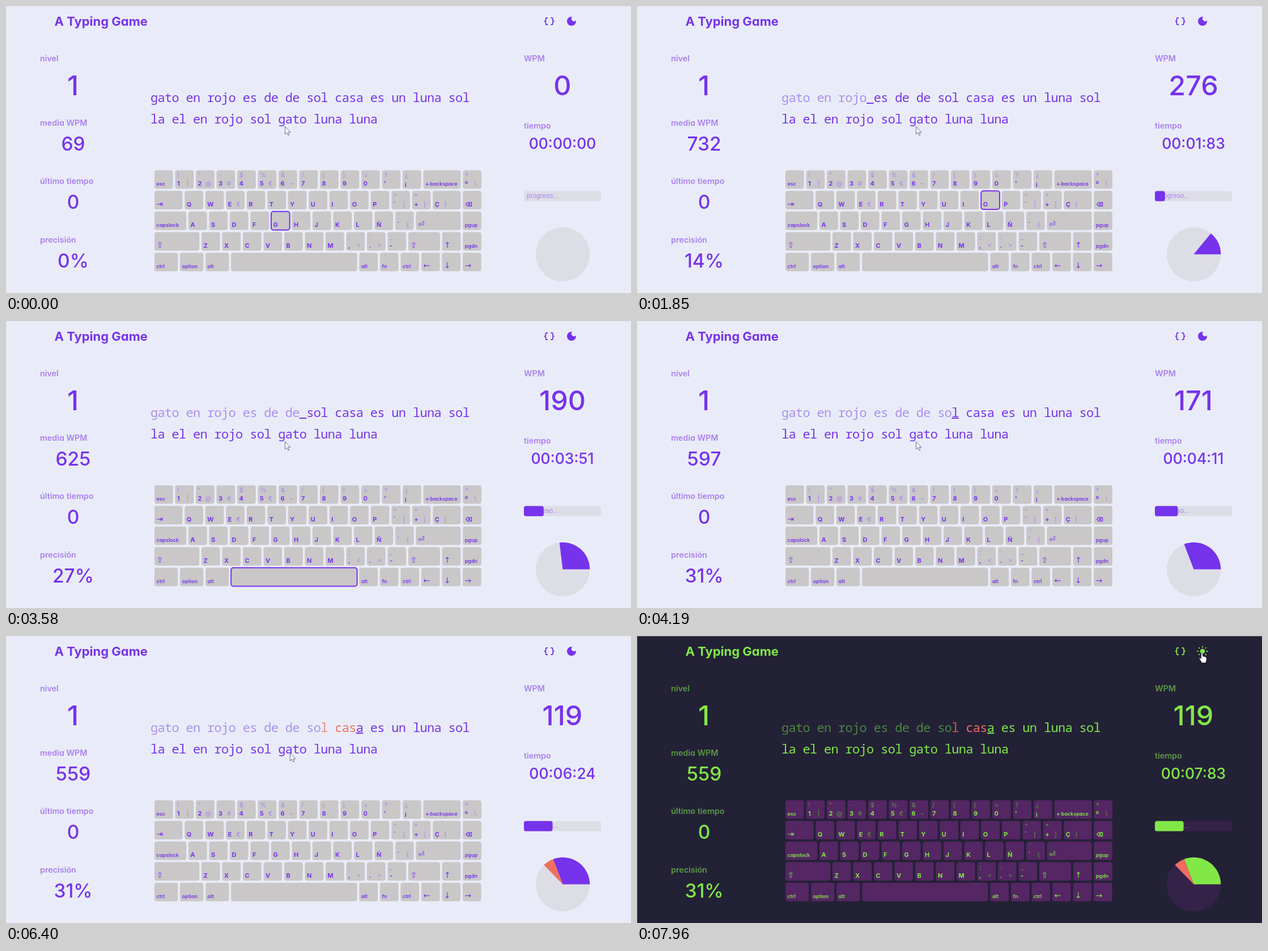
These frames come from a looping animation (1103 by 508 pixels, 8000 ms). An HTML page:

```html
<!DOCTYPE html>
<html lang="es">
<head>
<meta charset="utf-8">
<title>A Typing Game</title>
<style>
  :root {
    --bg: #e9ecf8; --edge: #e2e5f1; --main: #7633ec; --soft: #aa80f0; --done: #ac8ff0;
    --key: #c9c7c8; --track: #dddde6; --bad: #ef705f;
  }
  :root.dark {
    --bg: #232136; --edge: #5b5a69; --main: #82e847; --soft: #5c9a43; --done: #4d8540;
    --key: #542663; --track: #352249; --bad: #f06c60;
  }
  html, body { margin: 0; width: 100%; height: 100%; overflow: hidden; background: var(--bg); }
  svg { display: block; width: 100%; height: 100%; }
  text { font-family: Inter, "DejaVu Sans", sans-serif; font-weight: 500; fill: var(--main); white-space: pre; }
  .title { font-size: 22px; font-weight: 700; font-feature-settings: "cv11"; }
  .label { font-size: 14.3px; font-weight: 600; fill: var(--soft); font-feature-settings: "cv11"; }
  .big, .mid, .time { text-anchor: middle; }
  .big { font-size: 48.5px; }
  .mid { font-size: 33.5px; }
  .time { font-size: 26.5px; }
  .words { font: 400 22px "Noto Sans Mono", "DejaVu Sans Mono", monospace; letter-spacing: -0.69px; }
  .hint { font-size: 11px; font-weight: 400; fill: var(--soft); }
  .cap { font-size: 11px; font-weight: 700; }
  .name { font-size: 9px; font-weight: 600; font-feature-settings: "cv11"; }
  .icon { font: 400 14px "DejaVu Sans", sans-serif; }
  .alt { font-size: 11px; font-weight: 400; fill: var(--soft); }
  .key { fill: var(--key); }
  .key.on { stroke: var(--main); stroke-width: 2; }
  .done { fill: var(--done); }
  .bad { fill: var(--bad); }
  .main { fill: var(--main); }
  .track { fill: var(--track); }
  .line { fill: none; stroke: var(--main); stroke-width: 1.8; }
  .sun, .dark .moon, .hand { display: none; }
  .dark .sun { display: inline; }
</style>
</head>
<body>
<svg viewBox="0 0 1103 508">
  <rect width="1103" height="508" style="fill:var(--bg)"/>
  <path d="M.5 508V.5H1103" fill="none" style="stroke:var(--edge)"/>

  <text class="title" x="85.5" y="34.5">A Typing Game</text>
  <path class="line" d="M956 21h-1.5q-2 0-2 2v2q0 2-2.5 2q2.5 0 2.5 2v2q0 2 2 2h1.5M961.5 21h1.5q2 0 2 2v2q0 2 2.5 2q-2.5 0-2.5 2v2q0 2-2 2h-1.5"/>
  <path class="main moon" d="M998 19a8 8 0 1 0 8 8q0-.6-.1-1.2a4.6 4.6 0 0 1-6.7-6.7Q998.6 19 998 19z"/>
  <g class="sun">
    <circle class="main" cx="998" cy="27" r="4.3"/>
    <path class="line" d="M998 18v2.5M998 33.5v2.5M988.5 27h2.5M1005 27h2.5M991.3 20.3l1.7 1.7M1003 32l1.7 1.7M1004.7 20.3l-1.7 1.7M993 32l-1.7 1.7"/>
  </g>

  <text class="label" x="60" y="97.5">nivel</text>
  <text class="big" x="118" y="158">1</text>
  <text class="label" x="60" y="212">media WPM</text>
  <text class="mid" x="118.5" y="256" id="mean"></text>
  <text class="label" x="60" y="315">último tiempo</text>
  <text class="mid" x="118.5" y="359">0</text>
  <text class="label" x="60" y="419">precisión</text>
  <text class="mid" x="118.5" y="463" id="hits"></text>

  <text class="label" x="914" y="97.5">WPM</text>
  <text class="big" x="982" y="158" id="wpm"></text>
  <text class="label" x="914" y="217">tiempo</text>
  <text class="time" x="982" y="252.5" id="clock"></text>

  <rect class="track" x="914" y="327.6" width="136" height="17.8" rx="3.5"/>
  <text class="hint" x="918.5" y="340">progreso...</text>
  <rect class="main" x="914" y="327.6" height="17.8" rx="3.5" id="bar"/>
  <circle class="track" cx="982.5" cy="439.6" r="47.8"/>
  <path class="main" id="good"/>
  <path class="bad" id="wrong"/>

  <text class="words" x="255" y="170"><tspan class="done" id="typed"></tspan><tspan class="bad" id="slip" fill-opacity=".8"></tspan><tspan class="bad" id="slips"></tspan><tspan id="rest"></tspan></text>
  <text class="words" x="255" y="208" id="second"></text>
  <rect class="main" id="caret" y="171" width="12.5" height="2"/>

  <g id="keys"></g>

  <g id="mouse">
    <path class="arrow" d="M.5.5v13.5l3.2-3 2.3 5 2-1-2.2-4.6h4.2z" fill="#fff" stroke="#5a5880" stroke-width=".9" stroke-linejoin="round"/>
    <path class="hand" d="M2 1.5q0-1.5 1.3-1.5t1.4 1.5v4.5q2-.8 2.5.6q1.8-.7 2.3.7q2-.5 2 1.500v4.200l-1.500 4.500h-6.500l-3.500-5.500q-1.800-2.500-.8-3.200 1.200-.6 2.800 1.400z" fill="#fff" stroke="#232136" stroke-width=".8"/>
  </g>
</svg>
<script>
const LOOP = 8000, UNIT = 32.75, GAP = 3.75, CHAR = 12.51;
const LINE = "gato en rojo es de de sol casa es un luna sol";
const SECOND = "la el en rojo sol gato luna luna";
const TOTAL = LINE.length + 1 + SECOND.length;
const FIRST_SLIP = 24;
const PIE = { x: 982.5, y: 439.6, r: 47.8 };

// Each key: label, upper sign, side sign, width
const letters = s => [...s].map(c => [c]);
const ROWS = [
  [["esc"], ["1", "!", "|"], ["2", '"', "@"], ["3", "·", "#"], ["4", "$"], ["5", "%", "€"], ["6", "&", "¬"],
   ["7", "/"], ["8", "("], ["9", ")"], ["0", "="], ["'", "?"], ["¡", "¿"], ["←backspace", "", "", 66], ["º", "ª", "\\"]],
  [["⇥", "", "", 49.5], ["Q"], ["W"], ["E", "", "€"], ...letters("RTYUIOP"),
   ["`", "^", "["], ["+", "*", "]"], ["Ç", "", "}", 49.2], ["⌫"]],
  [["capslock", "", "", 56.2], ...letters("ASDFGHJKLÑ"), ["´", "¨", "{"], ["⏎", "", "", 79], ["pgup"]],
  [["⇧", "", "", 79.2], ...letters("ZXCVBNM"), [",", ";", "<"], [".", ":", ">"], ["-", "_"],
   ["⇧", "", "", 56], ["↑"], ["pgdn"]],
  [["ctrl", "", "", 41.3], ["option", "", "", 41.3], ["alt", "", "", 41.3], [" ", "", "", 222.5],
   ["alt"], ["fn"], ["ctrl"], ["←"], ["↓"], ["→"]]
];

// Time knots: [ms, value, ...]
const PRESSES = [[70, 1], [1850, 12], [2880, 18], [4040, 24], [4850, 25], [5410, 26], [5620, 27], [5900, 29]];
const CLOCK = [[0, 0], [1850, 183], [2950, 291], [4190, 411], [5530, 541], [7330, 721], [7960, 783], [8000, 787]];
const MOUSE = [[6330, 492, 213], [6700, 600, 140], [7190, 806, 30], [7330, 916.5, 27], [7500, 975, 20], [7650, 993.5, 30]];
// Scores by number of keys typed
const WPM = [[0, 0], [1, 950], [2, 860], [4, 528], [11, 276], [18, 209], [24, 171], [25, 147], [26, 130], [29, 119]];
const MEAN = [[0, 69], [1, 860], [11, 732], [18, 653], [24, 597], [26, 578], [29, 559]];

const $ = id => document.getElementById(id);
const put = (id, text) => { $(id).textContent = text; };

function lerp(knots, x, col = 1) {
  if (x <= knots[0][0]) return knots[0][col];
  for (let i = 1; i < knots.length; i++) {
    const a = knots[i - 1], b = knots[i];
    if (x <= b[0]) return a[col] + (b[col] - a[col]) * (x - a[0]) / (b[0] - a[0]);
  }
  return knots[knots.length - 1][col];
}

// The screen refreshes about every 70 ms
function snap(t) {
  const i = CLOCK.findIndex(k => k[0] > t);
  const from = CLOCK[i - 1][0], span = CLOCK[i][0] - from;
  const step = span / Math.max(1, Math.round(span / 70));
  return from + Math.floor((t - from) / step + 1e-6) * step;
}

const typedAt = t => t < PRESSES[0][0] ? 0 : Math.floor(lerp(PRESSES, t) + 1e-6);

function add(tag, cls, attrs, text = "") {
  const el = document.createElementNS("http://www.w3.org/2000/svg", tag);
  el.setAttribute("class", cls);
  for (const k in attrs) el.setAttribute(k, attrs[k]);
  el.textContent = text;
  return $("keys").appendChild(el);
}

const keyOf = {};
ROWS.forEach((row, r) => {
  let x = 262;
  const y = 290.8 + r * 36.5;
  for (const [label, upper, side, width = UNIT] of row) {
    keyOf[label] = add("rect", "key", { x, y, width, height: UNIT, rx: 4 });
    const kind = /^[←-⇿⏎]$/.test(label) ? "icon" : label.length > 1 ? "name" : "cap";
    add("text", kind, { x: x + 3.5, y: y + 27.5 }, label);
    if (upper) add("text", "alt", { x: x + 4, y: y + 12.5 }, upper);
    if (side) add("text", "alt", { x: x + 22, y: y + 27.5, "text-anchor": "middle" }, side);
    x += width + GAP;
  }
});
put("second", SECOND);

function slice(from, to) {
  if (to <= from) return "";
  const at = n => {
    const a = n / TOTAL * 2 * Math.PI;
    return `${PIE.x + PIE.r * Math.cos(a)} ${PIE.y - PIE.r * Math.sin(a)}`;
  };
  return `M${PIE.x} ${PIE.y}L${at(from)}A${PIE.r} ${PIE.r} 0 0 0 ${at(to)}z`;
}

let active = null;
function light(key) {
  if (key === active) return;
  if (active) active.classList.remove("on");
  if (key) key.classList.add("on");
  active = key;
}

function draw(time) {
  const t = snap(time);
  const n = typedAt(t), scored = typedAt(t - 60);
  const good = Math.min(scored, FIRST_SLIP);

  put("typed", LINE.slice(0, Math.min(n, FIRST_SLIP)));
  put("slip", n > FIRST_SLIP ? LINE[FIRST_SLIP] : "");
  put("slips", LINE.slice(FIRST_SLIP + 1, Math.max(n, FIRST_SLIP + 1)));
  put("rest", LINE.slice(n));
  $("caret").setAttribute("x", 255 + n * CHAR);
  $("caret").setAttribute("visibility", n ? "visible" : "hidden");

  put("wpm", Math.round(lerp(WPM, scored)));
  put("mean", Math.round(lerp(MEAN, scored)));
  put("hits", Math.round(good / TOTAL * 100) + "%");
  const cs = Math.round(lerp(CLOCK, t));
  const two = v => String(v).padStart(2, "0");
  put("clock", `00:${two(Math.floor(cs / 100))}:${two(cs % 100)}`);

  // The bar trails behind the typing
  let sum = 0;
  for (let i = 1; i <= 6; i++) sum += typedAt(t - 60 * i);
  $("bar").setAttribute("width", 136 * sum / 6 / TOTAL);
  $("good").setAttribute("d", slice(0, good));
  $("wrong").setAttribute("d", slice(good, scored));
  light(scored < FIRST_SLIP ? keyOf[LINE[scored].toUpperCase()] : null);

  const hover = t >= 7640;
  document.querySelector(".hand").style.display = hover ? "inline" : "none";
  document.querySelector(".arrow").style.display = hover ? "none" : "inline";
  $("mouse").setAttribute("transform", `translate(${lerp(MOUSE, t)} ${lerp(MOUSE, t, 2)})`);
  document.documentElement.classList.toggle("dark", time >= 7960);
}

const start = performance.now();
function tick() {
  draw((performance.now() - start) % LOOP);
  requestAnimationFrame(tick);
}
tick();
</script>
</body>
</html>
```
